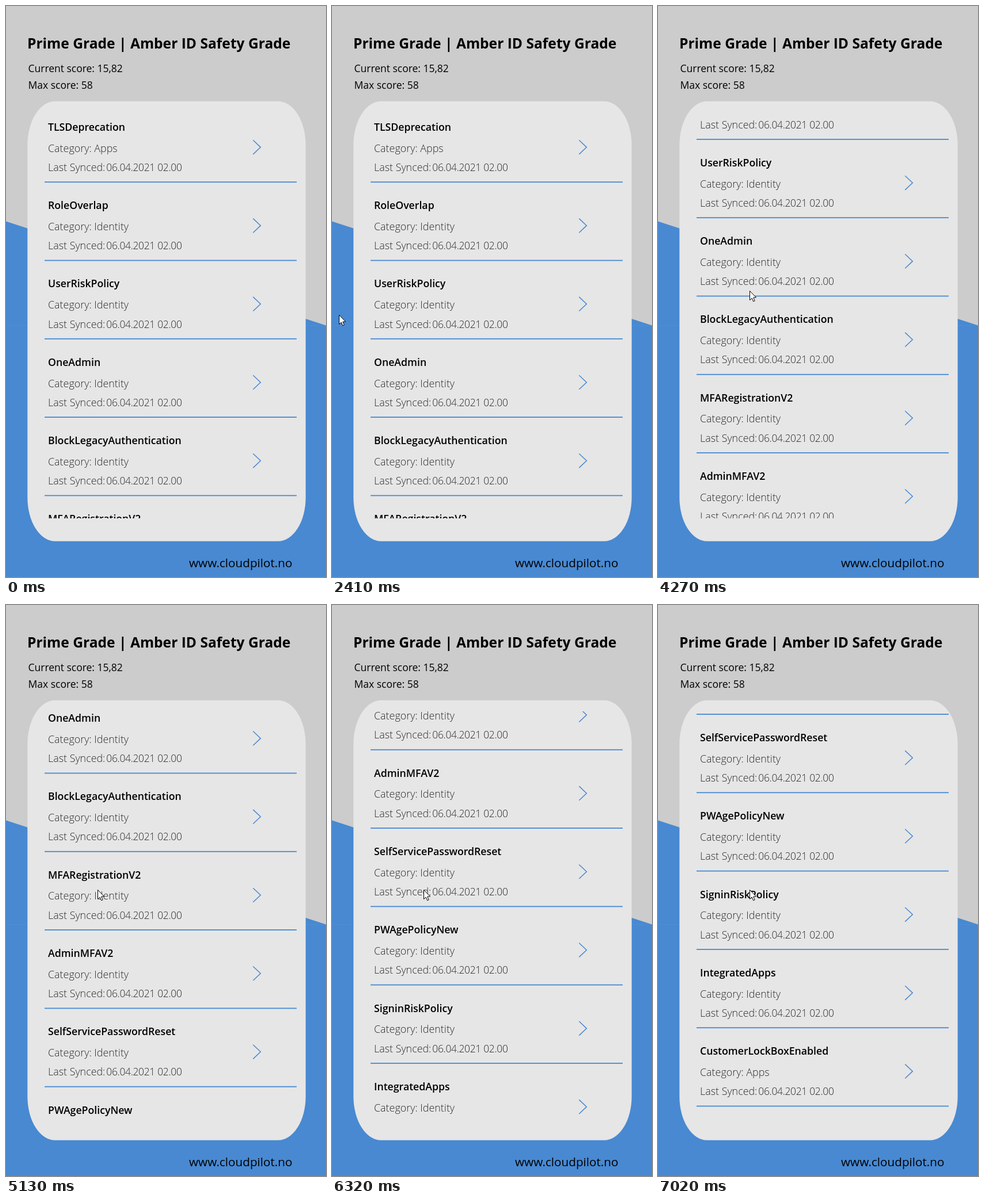
These frames come from a looping animation (556x993 px, 8 s). An HTML page with a canvas:

```html
<!DOCTYPE html>
<html lang="en">
<head>
<meta charset="utf-8">
<title>Score list</title>
<style>
html, body { margin: 0; width: 100%; height: 100%; overflow: hidden; background: #ccc; }
canvas { display: block; width: 556px; height: 993px; }
</style>
</head>
<body>
<canvas id="stage"></canvas>
<script>
const W = 556, H = 993, LOOP = 8000;
const BLUE = '#4889d2', GREY = '#cccccc', CARD = '#e6e6e6';
const PITCH = 136.3, NOTCH = 106;
const FAMILY = '"Open Sans", "Noto Sans", sans-serif';

const rows = [
  'TLSDeprecation', 'RoleOverlap', 'UserRiskPolicy', 'OneAdmin',
  'BlockLegacyAuthentication', 'MFARegistrationV2', 'AdminMFAV2',
  'SelfServicePasswordReset', 'PWAgePolicyNew', 'SigninRiskPolicy',
  'IntegratedApps', 'CustomerLockBoxEnabled'
];
const appRows = new Set(['TLSDeprecation', 'CustomerLockBoxEnabled']);

// Each wheel notch moves the list in three quick, decaying steps.
const notches = [
  [3710, 3800, 3880], [4110, 4190, 4270], [4560, 4650, 4750], [4960, 5050, 5130],
  [5520, 5600, 5680], [5750, 5830, 5910], [6220, 6320, 6390], [6460, 6540, 6610]
];
const scrollSteps = [[0, 0]];
notches.forEach((times, n) => {
  [0.615, 0.943, 0.987].forEach((part, i) => scrollSteps.push([times[i], (n + part) * NOTCH]));
});
// The last notch stops at the end of the list.
scrollSteps.push([6770, 900], [6850, 925], [6930, 932], [7020, 934]);

const pointerSteps = [[2410, 0], [2520, 0.35], [2600, 0.7], [2680, 0.92], [2750, 1]];

const canvas = document.getElementById('stage');
const ctx = canvas.getContext('2d');
const dpr = window.devicePixelRatio || 1;
canvas.width = Math.round(W * dpr);
canvas.height = Math.round(H * dpr);

function held(steps, t) {
  let value = steps[0][1];
  for (const [at, v] of steps) if (t >= at) value = v;
  return value;
}

function text(str, x, y, size, weight, color = '#000', spacing = 0) {
  ctx.font = `${weight} ${size}px ${FAMILY}`;
  ctx.letterSpacing = spacing + 'px';
  ctx.fillStyle = color;
  ctx.fillText(str, x, Math.round(y));
}

function trace(points, close) {
  ctx.beginPath();
  points.forEach(([x, y]) => ctx.lineTo(x, y));
  if (close) ctx.closePath();
}

function drawBackground() {
  ctx.fillStyle = GREY;
  ctx.fillRect(0, 0, W, H);
  ctx.fillStyle = BLUE;
  trace([[0, 374.6], [W, 555.5], [W, H], [0, H]], true);
  ctx.fill();
  ctx.fillStyle = 'rgba(255,255,255,0.04)';
  ctx.fillRect(0, 555, W, 1);
}

function drawCard() {
  const l = 37.3, r = 520.7, t = 165.8, b = 930.8, rx = 48, ry = 76;
  const q = Math.PI / 2;
  ctx.beginPath();
  ctx.ellipse(l + rx, t + ry, rx, ry, 0, 2 * q, 3 * q);
  ctx.ellipse(r - rx, t + ry, rx, ry, 0, 3 * q, 4 * q);
  ctx.ellipse(r - rx, b - ry, rx, ry, 0, 0, q);
  ctx.ellipse(l + rx, b - ry, rx, ry, 0, q, 2 * q);
  ctx.closePath();
  ctx.fillStyle = CARD;
  ctx.fill();
}

function drawRow(name, dy) {
  const soft = '#2b2b2b';
  text(name, 73, 216.8 + dy, 17.7, 600);
  text('Category: ' + (appRows.has(name) ? 'Apps' : 'Identity'), 73, 253.6 + dy, 17.9, 300, soft);
  text('Last Synced:', 73, 286.9 + dy, 17.9, 300, soft);
  text('06.04.2021 02.00', 174.3, 286.9 + dy, 17.4, 300, soft, -0.3);

  ctx.strokeStyle = BLUE;
  ctx.lineWidth = 1.5;
  trace([[429.3, 233.3 + dy], [442.3, 245.6 + dy], [429.3, 257.9 + dy]]);
  ctx.stroke();
  ctx.fillStyle = BLUE;
  ctx.fillRect(67, 305.3 + dy, 438, 1.8);
}

function drawList(scroll) {
  ctx.save();
  ctx.beginPath();
  ctx.rect(67, 185, 438, 706);
  ctx.clip();
  rows.forEach((name, i) => {
    const dy = i * PITCH - scroll;
    if (dy > -140 && dy < 710) drawRow(name, dy);
  });
  ctx.restore();
}

function drawPointer(t) {
  if (t < pointerSteps[0][0]) return;
  const k = held(pointerSteps, t);
  ctx.save();
  ctx.translate(12.5 + 147 * k, 537.5 - 42 * k);
  trace([[0, 0], [0, 16], [3.6, 12.6], [6.2, 18.3], [8.7, 17.2], [6.2, 11.6], [11, 11.4]], true);
  ctx.fillStyle = '#fff';
  ctx.fill();
  ctx.strokeStyle = '#000';
  ctx.lineWidth = 1;
  ctx.stroke();
  ctx.restore();
}

function draw(t) {
  ctx.setTransform(dpr, 0, 0, dpr, 0, 0);
  drawBackground();
  text('Prime Grade | Amber ID Safety Grade', 37, 74, 24.6, 700);
  text('Current score: 15,82', 38.5, 115, 17.5, 400);
  text('Max score: 58', 38.5, 144, 17.5, 400);
  drawCard();
  drawList(held(scrollSteps, t));
  text('www.cloudpilot.no', 318, 976, 20.7, 500);
  drawPointer(t);
}

const start = performance.now();
function frame() {
  draw((performance.now() - start) % LOOP);
  requestAnimationFrame(frame);
}
frame();
</script>
</body>
</html>
```
